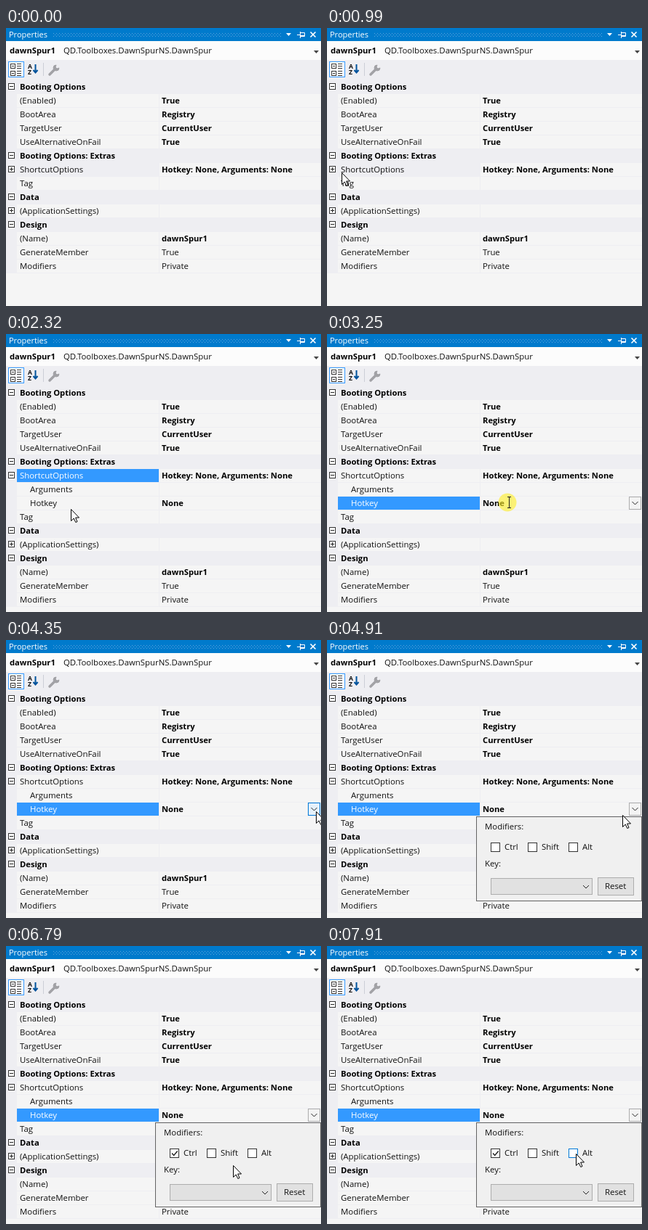
Animation of 433x383 px, one loop 8000 ms. Source, as an HTML page:

```html
<!DOCTYPE html>
<html lang="en">
<head>
<meta charset="utf-8">
<title>Properties panel</title>
<style>
  html, body { margin: 0; width: 100%; height: 100%; overflow: hidden; background: #f5f5f5; }
  svg { display: block; width: 433px; height: 383px; }
  text { font: 11.4px "Open Sans", "Noto Sans", sans-serif; fill: #111; white-space: pre; }
  .b { font-weight: 700; font-size: 11.2px; fill: #000; }
  .w { fill: #fff; }
  .title { font-size: 11px; }
  .tiny { font-size: 8.5px; font-weight: 700; }
  .line { fill: none; stroke: #222; }
  .light { stroke: #fff; }
  .grip { stroke: #59a8de; stroke-dasharray: 1 3; }
</style>
</head>
<body>
<svg id="stage" viewBox="0 0 433 383"></svg>
<script>
const LOOP = 8000, TICK = 80, ROW = 19;
const CLICK = { expand: 1620, pick: 3160, open: 4500, check: 5970 };
const EXPAND = CLICK.expand + TICK, OPEN = CLICK.open + 2 * TICK, CHECK = CLICK.check + TICK;
const BLUE = '#3399ff', ACCENT = '#0078d7', PALE = '#eeeef2', CELL = '#f5f5f5';

const rect = (x, y, w, h, fill, stroke) => stroke
  ? `<rect x="${x + .5}" y="${y + .5}" width="${w - 1}" height="${h - 1}" fill="${fill}" stroke="${stroke}"/>`
  : `<rect x="${x}" y="${y}" width="${w}" height="${h}" fill="${fill}"/>`;
const text = (x, mid, s, cls = '') => `<text x="${x}" y="${mid + 4}" class="${cls}">${s}</text>`;
const path = (d, cls = '', style = '') => `<path class="line ${cls}" d="${d}" style="${style}"/>`;
const down = (x, y, fill) => `<path d="M${x} ${y}h7l-3.500 4z" fill="${fill}"/>`;
const chevron = (x, y) => path(`M${x - 4} ${y - 2}l4 4 4-4`);
// Content visible only from one time to another
const during = (from, to, s) => `<g data-from="${from}" data-to="${to}">${s}</g>`;
const rowMid = i => 81 + ROW * i;

const TOP_ROWS = [
  { name: 'Booting Options', open: true },
  { name: '(Enabled)', value: 'True' },
  { name: 'BootArea', value: 'Registry' },
  { name: 'TargetUser', value: 'CurrentUser' },
  { name: 'UseAlternativeOnFail', value: 'True' },
  { name: 'Booting Options: Extras', open: true },
  { name: 'ShortcutOptions', value: 'Hotkey: None, Arguments: None', plus: EXPAND }
];
const CHILD_ROWS = [
  { name: 'Arguments', x: 33 },
  { name: 'Hotkey', value: 'None', x: 33 }
];
const LOWER_ROWS = [
  { name: 'Tag' },
  { name: 'Data', open: true },
  { name: '(ApplicationSettings)', plus: LOOP },
  { name: 'Design', open: true },
  { name: '(Name)', value: 'dawnSpur1' },
  { name: 'GenerateMember', value: 'True', plain: true },
  { name: 'Modifiers', value: 'Private', plain: true }
];

// The sign is a plus until the given time, then a minus
const expander = (mid, plus) => rect(3, mid - 5, 9, 9, '#fff', '#333') +
  rect(5, mid - 1, 5, 1, '#222') + during(0, plus, rect(7, mid - 3, 1, 5, '#222'));

function row({ name, value = '', open, plus, plain, x = 19 }, i) {
  const mid = rowMid(i), top = mid - 9;
  const sign = open || plus ? expander(mid, plus || 0) : '';
  const base = rect(0, top, 433, ROW, PALE) + sign;
  if (open) return base + text(x, mid, name, 'b');
  return base + rect(15, top, 195, ROW - 1, CELL) + rect(211, top, 222, ROW - 1, CELL) +
    text(x, mid, name) + text(214, mid, value, plain ? '' : 'b');
}

const rows = (list, first) => list.map((r, i) => row(r, first + i)).join('');

const selected = (i, name, x, fill, cls) =>
  rect(15, rowMid(i) - 9, 195, ROW - 1, fill) + text(x, rowMid(i), name, cls);

function grid() {
  const child = TOP_ROWS.length;
  return rect(0, 72, 15, 311, PALE) + rect(0, 338, 433, 45, CELL) + rows(TOP_ROWS, 0) +
    `<g id="lower">${rows(LOWER_ROWS, child)}</g>` +
    during(EXPAND, LOOP, rows(CHILD_ROWS, child)) +
    during(0, EXPAND, selected(6, 'ShortcutOptions', 19, PALE)) +
    during(EXPAND, CLICK.pick, selected(6, 'ShortcutOptions', 19, BLUE, 'w')) +
    during(CLICK.pick, LOOP, selected(8, 'Hotkey', 33, BLUE, 'w'));
}

function header() {
  const grip = [0, 1, 2].map(k => path(`M${65 + k % 2 * 2} ${7.5 + 2 * k}H379`, 'grip')).join('');
  return rect(0, 0, 433, 18, '#007acc') + grip + text(4, 9, 'Properties', 'w title') +
    down(385, 7, '#fff') +
    path('M400 9.500h4M404.500 5v9M404.500 6.500h6v5h-6M404.500 10.500h6', 'light') +
    path('M418.500 5.500l7 7m0-7l-7 7', 'light', 'stroke-width:1.7') +
    rect(0, 18, 433, 26, '#fcfcfc') +
    text(5, 31, 'dawnSpur1', 'b') + text(79, 31, 'QD.Toolboxes.DawnSpurNS.DawnSpur') +
    down(423, 31, '#444');
}

function toolbar() {
  const group = y => rect(6, y, 7, 7, '#fff', '#333') + rect(8, y + 3, 3, 1, '#333') +
    [0, 3, 6].map(k => rect(15, y + k, 6, 1, '#333')).join('');
  return rect(0, 44, 433, 28, PALE) + rect(3, 46, 22, 22, '#fdfdfe', BLUE) + group(49) + group(59) +
    text(30, 52, 'A', 'tiny') + text(30, 60, 'Z', 'tiny') +
    path('M40.500 50v11m-3-3l3 3.500 3-3.500', '', 'stroke:#00539c;stroke-width:2') +
    rect(51, 48, 1, 18, '#ccced6') +
    path('M60 64l7-7', '', 'stroke:#a2a2a6;stroke-width:3.5;stroke-linecap:round') +
    path('M69 51a4 4 0 1 0 4 4l-3 1-2-2z', '', 'stroke:#a2a2a6;fill:#a2a2a6');
}

function editor() {
  const button = (fill, stroke) => rect(415, 224, 17, 18, fill, stroke) + chevron(423.5, 233);
  return during(CLICK.pick, LOOP, button('#f3f3f3', '#adadad')) +
    during(3820, 4910, button('#e5f1fb', ACCENT)) +
    during(CLICK.open, OPEN, button('#cce4f7', '#005499')) +
    during(3330, 4350, rect(244, 225, 1, 15, '#000'));
}

const checkbox = (x, label, from, to) => rect(x, 279, 13, 13, '#fff', '#333') +
  during(from, to, rect(x, 279, 13, 13, '#fff', ACCENT)) + text(x + 19, 285, label);

function popup() {
  return during(OPEN, LOOP,
    rect(205, 243, 228, 117, '#f0f0f0', '#646464') +
    text(217, 257, 'Modifiers:') +
    checkbox(225, 'Ctrl', 5500, 6250) +
    checkbox(276, 'Shift', 7160, 7460) +
    checkbox(332, 'Alt', 7760, LOOP) +
    during(CHECK, LOOP, path('M228 285.500l2.700 3 5-6', '', 'stroke-width:1.4')) +
    text(217, 308, 'Key:') +
    rect(225, 328, 140, 23, '#e1e1e1', '#adadad') + chevron(356, 340) +
    rect(372, 327, 50, 25, '#e1e1e1', '#adadad') + text(382, 339, 'Reset'));
}

function pointer() {
  const ring = '<circle r="12.500" fill="#ffee22" opacity=".6"/>';
  const arrow = '<path d="M.5 .5v16l3.700-3.500 2.600 5.500 2.200-1-2.400-5.500h4.900z" fill="#fff" stroke="#000"/>';
  const beam = path('M0-7.500h5M2.500-7v14M0 7.500h5');
  return '<g id="pointer">' +
    Object.values(CLICK).map(t => during(t, t + 2.5 * TICK, ring)).join('') +
    during(300, CLICK.pick, arrow) + during(CLICK.pick, 3720, beam) + during(3720, LOOP, arrow) + '</g>';
}

// Each hop leads from the previous resting point to (x, y)
const START = { x: 265, y: 351 };
const HOPS = [
  { from: 300, to: 1080, x: 17, y: 197, ease: 2 },
  { from: 1080, to: 1310, x: 10, y: 196 },
  { from: 2010, to: 2860, x: 225, y: 247, sag: 29 },
  { from: 2860, to: CLICK.pick, x: 248, y: 232 },
  { from: 3330, to: 3820, x: 424, y: 233 },
  { from: 3950, to: 4200, x: 426, y: 236 },
  { from: 4830, to: 5590, x: 235, y: 287 },
  { from: 6130, to: 6520, x: 304, y: 302, sag: 8 },
  { from: 6600, to: 6990, x: 321, y: 302 },
  { from: 6990, to: 7310, x: 316, y: 295 },
  { from: 7380, to: 7910, x: 342, y: 286, sag: 6 }
];

function position(t) {
  let { x, y } = START;
  for (const { from, to, x: endX, y: endY, ease = 1, sag = 0 } of HOPS) {
    if (t < from) break;
    const p = 1 - (1 - Math.min(1, (t - from) / (to - from))) ** ease;
    x += (endX - x) * p;
    y += (endY - y) * p + sag * Math.sin(Math.PI * p);
  }
  return [Math.round(x), Math.round(y)];
}

const stage = document.getElementById('stage');
stage.innerHTML = rect(0, 0, 433, 383, CELL) + grid() + header() + toolbar() +
  editor() + popup() + pointer();
const lower = document.getElementById('lower');
const cursor = document.getElementById('pointer');
const timed = [...stage.querySelectorAll('[data-from]')].map(el => [el, +el.dataset.from, +el.dataset.to]);

function draw() {
  const t = performance.now() % LOOP;
  for (const [el, from, to] of timed) el.style.display = t >= from && t < to ? '' : 'none';
  lower.setAttribute('transform', `translate(0 ${t >= EXPAND ? CHILD_ROWS.length * ROW : 0})`);
  cursor.setAttribute('transform', `translate(${position(t)})`);
  requestAnimationFrame(draw);
}
draw();
</script>
</body>
</html>
```
